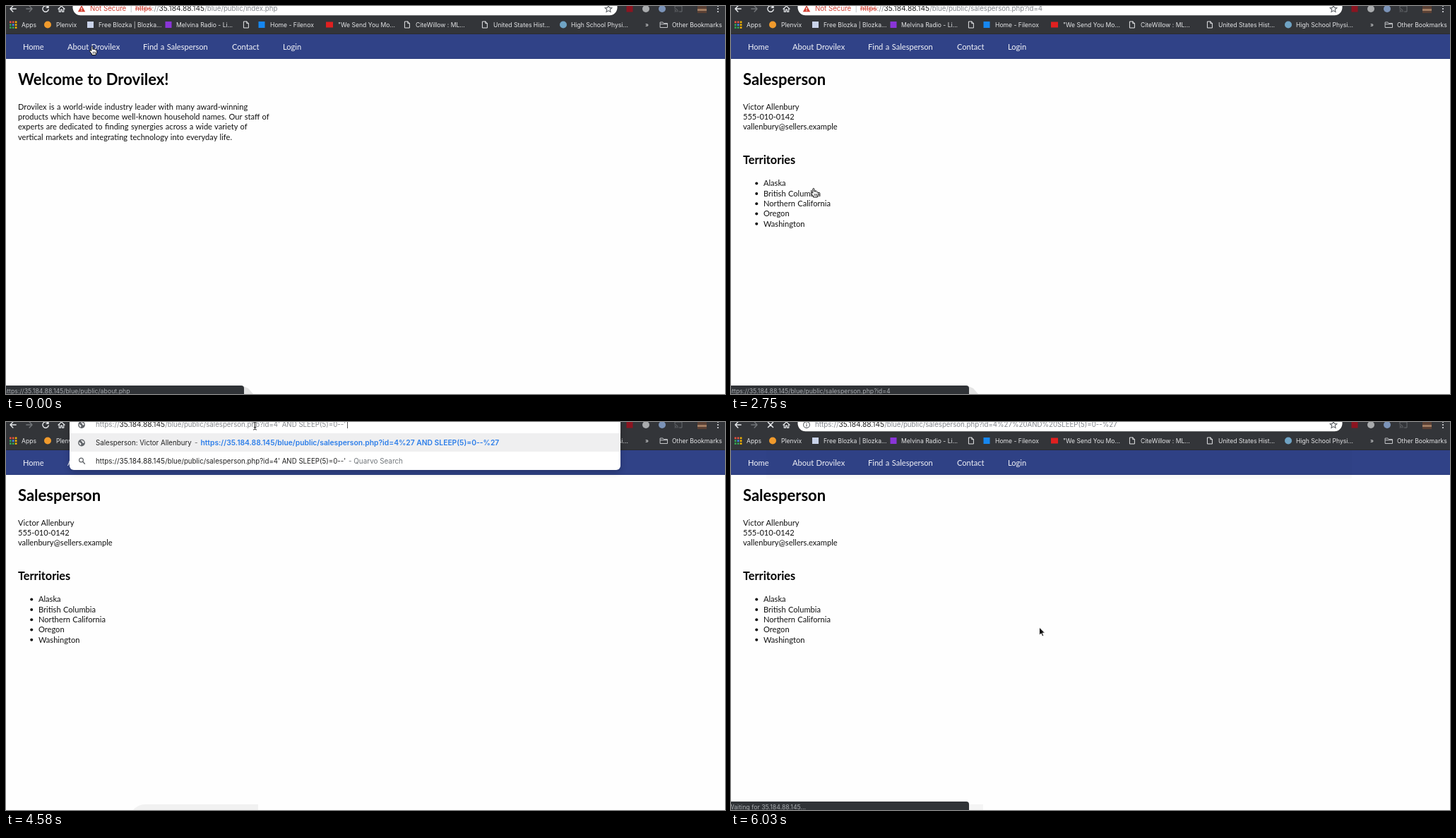
An HTML page for the animation above (8 s loop, 1018 by 550 pixels).

```html
<!DOCTYPE html>
<html lang="en">
<head>
<meta charset="utf-8">
<title>Browser session</title>
<style>
html, body { margin: 0; width: 100%; height: 100%; overflow: hidden; background: #fefefe; }
svg { display: block; width: 100%; height: 100%; }
text { white-space: pre; }
.ui { font-family: Inter, Roboto, sans-serif; }
.page { font-family: Lato, "Open Sans", sans-serif; word-spacing: .6px; }
.raised { filter: drop-shadow(0 3px 4px rgba(0, 0, 0, .22)); }
</style>
</head>
<body>
<svg id="stage" viewBox="0 0 1018 550" xmlns="http://www.w3.org/2000/svg"></svg>
<script>
const LOOP = 8000;
const HOST = '35.184.88.145';
const DIR = '/blue/public/';
const REP = 'Victor Allenbury';
const LINE = 14.3;

// ---- drawing helpers ----
const text = (cls, x, y, s, size, fill, extra = '') =>
  `<text class="${cls}" x="${x}" y="${y}" font-size="${size}" fill="${fill}" ${extra}>${s}</text>`;
const ui = (x, y, s, size, fill, extra) => text('ui', x, y, s, size, fill, extra);
const body = (x, y, s, fill = '#111', extra) => text('page', x, y, s, 11.1, fill, extra);
const title = (x, y, s, size) => text('page', x, y, s, size, '#000', 'font-weight="700"');
const link = (x, y, s) => body(x, y, s, '#00e', 'text-decoration="underline"');
const rect = (x, y, w, h, fill, extra = '') =>
  `<rect x="${x}" y="${y}" width="${w}" height="${h}" fill="${fill}" ${extra}/>`;
const dot = (x, y, r, fill, extra = '') => `<circle cx="${x}" cy="${y}" r="${r}" fill="${fill}" ${extra}/>`;
const path = (d, fill, extra = '') => `<path d="${d}" fill="${fill}" ${extra}/>`;
const line = (d, color, w = 1.3) =>
  path(d, 'none', `stroke="${color}" stroke-width="${w}" stroke-linecap="round" stroke-linejoin="round"`);
const at = (x, y, s) => `<g transform="translate(${x} ${y})">${s}</g>`;

// ---- icons, centred on 0,0 ----
const doc = line('M-3.2-4.5H.8L3.4-1.8V4.5H-3.2ZM.8-4.5V-1.8H3.4', '#e4e5e7', 1);
const folder = line('M-5-3.5H-1.5L-.2-2H5V4H-5ZM-5-.8H5', '#c4c6c9', 1);
const globe = dot(0, 0, 4.9, '#5f6368') +
  path('M-3.8-1.2L-1.2.2L-.4 1.6L-1.2 3.8Q-3.8 2.4-3.8-1.2ZM-.6-3.8Q2.8-3.6 3.8-.6L2.4.8L.8-.4L1.2-1.8L-.8-2.2Z', '#eee');
const lens = line('M1.2 1.2L4 4.2', '#5f6368', 1.3) +
  dot(-1, -1, 2.9, 'none', 'stroke="#5f6368" stroke-width="1.2"');
const info = dot(0, 0, 4.4, 'none', 'stroke="#5f6368" stroke-width="1.1"') +
  rect(-.6, -.6, 1.2, 3, '#5f6368') + rect(-.6, -2.5, 1.2, 1.2, '#5f6368');
const warning = path('M0-5L5.2 4.3H-5.2Z', '#d23f31') + rect(-.6, -1.8, 1.2, 3, '#fff') + rect(-.6, 2, 1.2, 1.1, '#fff');
const star = path('M0-4.8L1.4-1.6L4.8-1.3L2.2 1L3 4.4L0 2.6L-3 4.4L-2.2 1L-4.8-1.3L-1.4-1.6Z', 'none',
  'stroke="#5f6368" stroke-width="1.1"');
const reload = line('M3.5-2.4A4.2 4.2 0 1 0 4.2 1M4-4.5V-1.6H1.1', '#e8eaed', 1.4);
const stop = line('M-3.5-3.5L3.5 3.5M3.5-3.5L-3.5 3.5', '#e8eaed', 1.5);
const home = line('M-4.6.2L0-4L4.6.2M-3.2-.5V4.2H-1V1.2H1V4.2H3.2V-.5', '#e8eaed', 1.2);
const arrowBack = line('M4.2 0H-4M-.2-4L-4 0L-.2 4', '#e8eaed', 1.4);
const arrowNext = line('M-4.2 0H4M.2-4L4 0L.2 4', '#73767a', 1.4);
const cast = line('M-5-1.5V-4H5V4H1.5M-5 4H-4.6M-5 1.8Q-2.8 1.8-2.8 4M-5-.2Q-.8-.2-.8 4', '#696c70', 1);

const beam = 'M-2-5Q0-5 0-3.8Q0-5 2-5M0-3.8V4.8M-2 6Q0 6 0 4.8Q0 6 2 6M-1.2 2.5H1.2';
const pointers = {
  arrow: path('M0 0V11.2L2.6 8.8L4.4 12.8L6.2 12L4.5 8.1H8Z', '#111', 'stroke="#fff" stroke-width=".9"'),
  hand: path('M-2.7.8V-5.3Q-1.6-7-.6-5.3V-1.6Q.6-2.6 1.3-1.3Q2.5-2 3.1-.8Q4.9-1.2 5.1.7V2.8Q4.9 4.2 3.8 5V6.5H-2V5L-4.9 1.3Q-5.6-.5-3.9-.3Z',
    '#fff', 'stroke="#111" stroke-width="1"') + line('M-.3 2V4.4M1.4 2V4.4M3 2V4.4', '#111', .7),
  beam: line(beam, '#fff', 2.2) + line(beam, '#222', 1)
};

// ---- browser chrome ----
function appGrid() {
  const colors = ['#e8513f', '#e8513f', '#f4b400', '#34a853', '#4285f4', '#f4b400', '#34a853', '#34a853', '#f4b400'];
  return colors.map((c, i) => rect(5 + i % 3 * 3.9, 21.5 + Math.floor(i / 3) * 3.9, 2.6, 2.6, c)).join('');
}

function bookmarks() {
  const labels = [[22, 'Apps'], [71, 'Plenvix'], [131, 'Free Blozka | Blozka...'], [241, 'Melvina Radio - Li...'],
    [374, 'Home - Filenox'], [470, '"We Send You Mo...'], [580, 'CiteWillow : ML...'],
    [690, 'United States Hist...'], [800, 'High School Physi...'], [905, '»'], [943, 'Other Bookmarks']];
  return appGrid() + labels.map(([x, s]) => ui(x, 29.6, s, 8.6, '#e4e5e7')).join('') +
    dot(59, 26.5, 5, '#f09a2c') + rect(115, 22, 9, 9, '#c9d3ea') + rect(225.5, 22, 9, 9, '#8a35d8') +
    rect(357.5, 22, 9, 9, '#1687f0') + rect(453, 22.5, 10, 8, '#e02020') + dot(789, 26.5, 5, '#6fa3c4') +
    [340, 568, 678].map(x => at(x, 26.5, doc)).join('') + at(931.5, 26.5, folder);
}

function toolbar(s) {
  const dots = [0, 4, 8].map(y => dot(1008, y, 1.1, '#dadce0')).join('');
  return rect(0, 0, 1018, 40, '#333539') + rect(0, 39, 1018, 1, '#292b2f') +
    at(10, 4, arrowBack) + at(33, 4, arrowNext) + at(56, 4, s.loading ? stop : reload) + at(78.5, 4, home) +
    rect(94.5, -12, 771, 25.3, '#fff', `rx="11" ${s.selected ? 'stroke="#a9cdf7" stroke-width="2"' : ''}`) +
    address(s) + at(853, 4, star) +
    rect(878.5, -1, 9, 9.5, '#8c1420') + dot(906, 4, 5, '#a9abad') + dot(929, 4, 5, '#7b93b8') + at(952, 4, cast) +
    rect(979, 0, 13, 10, '#5a4034') + rect(979, 4, 13, 3, '#a07c62') + dots + bookmarks();
}

// scheme, host and path as three runs
function url(x, y, tail, c, hostColor, schemeExtra) {
  return ui(x, y, `<tspan ${schemeExtra || ''}>https</tspan>://`, 9.9, c) +
    ui(x + 33.4, y, HOST, 10.2, hostColor) + ui(x + 98.3, y, DIR + tail, 9.7, c);
}

function address(s) {
  if (s.loading)
    return at(107, 4, info) + url(119, 7.4, 'salesperson.php?id=4%27%20AND%20SLEEP(5)=0--%27', '#80848a', '#222');
  const strike = 'text-decoration="line-through"';
  return at(107, 4, warning) + ui(119, 7.4, 'Not Secure', 9.7, '#d23f31') + rect(176.7, -1, 1, 10, '#c4c6c9') +
    (s.selected
      ? rect(183, -2, 259, 12.5, '#b2d4fb') + url(183, 7.4, s.url, '#3c4043', '#222', strike)
      : url(183, 7.4, s.url, '#80848a', '#222', `fill="#d23f31" ${strike}`));
}

function dropdown(s) {
  const typed = "salesperson.php?id=4' AND SLEEP(5)=0--'";
  return rect(90, -10, 780, 78, '#fff', 'rx="6" class="raised"') + rect(90, 16, 780, 26, '#efeff0') +
    at(107, 4, globe) + at(107, 29.5, globe) + at(107.5, 55, lens) +
    url(127, 7.4, typed, '#85888c', '#222') + (s.caret ? rect(483, -1, 1, 10, '#555') : '') +
    ui(127, 33, 'Salesperson: ' + REP, 9.7, '#222') + ui(267, 33, '-', 9.9, '#666') +
    ui(275.5, 33, `https://${HOST}${DIR}salesperson.php?id=4%27 AND SLEEP(5)=0--%27`, 10.3, '#2b7de9', 'font-weight="600"') +
    url(127, 58.7, typed, '#222', '#222') + ui(485, 58.7, '- Quarvo Search', 9.9, '#70757a');
}

function statusBar(s) {
  if (!s.status) return s.tail ? path('M180 550Q187 542 197 542H357V550Z', '#f1f1f1') : '';
  const tail = s.loading ? rect(337, 542, 20, 8, '#f4f4f4') : path('M336 539L343 542L350 550H336Z', '#e3e3e3');
  return tail + path('M0 538H333Q337 538 337 542V550H0Z', '#303337') + ui(-4, 548.9, s.status, 8.75, '#a9acb0');
}

// ---- web pages ----
function nav() {
  const items = [[24, 'Home'], [87, 'About Drovilex'], [194, 'Find a Salesperson'], [320, 'Contact'], [392, 'Login']];
  return rect(0, 40, 1018, 35, '#304287') + rect(0, 74, 1018, 1, '#2b3c7c') +
    items.map(([x, s]) => body(x, 62.2, s, '#f4f5fa')).join('');
}

const paragraph = (y, lines) => lines.map((s, i) => body(17, y + i * LINE, s)).join('');

const pages = {
  welcome: () => title(17, 112.3, 'Welcome to Drovilex!', 22) + paragraph(146.7, [
    'Drovilex is a world-wide industry leader with many award-winning',
    'products which have become well-known household names. Our staff of',
    'experts are dedicated to finding synergies across a wide variety of',
    'vertical markets and integrating technology into everyday life.']),

  territories() {
    const states = [['Alabama (AL)', 'Dylan Marsh'], ['Alaska (AK)', REP], ['Arizona (AZ)', 'Nora Belling'],
      ['Arkansas (AR)', 'Margaret Finley'],
      ['California (CA)', '*Northern California', REP, '*Southern California', 'Carrie Dornell'],
      ['Colorado (CO)', 'Nora Belling'], ['Connecticut (CT)', 'Pamela Westrick'], ['Delaware (DE)']];
    let y = 212.3;
    let out = title(17, 112.3, 'Find a Salesperson', 22) +
      paragraph(146.7, ['Use the list below to find a salesperson nearby. We are ready to serve', 'you!']) +
      body(17, 186.6, 'UNITED STATES', '#000', 'font-weight="700"');
    for (const [state, ...rows] of states) {
      out += body(17, y, state);
      rows.forEach((row, i) => {
        y += LINE;
        const region = row[0] === '*';
        if (region || !i) out += rect(34.5, y - 5.8, 4, 4, '#111');
        out += region ? body(46, y, row.slice(1)) : link(46, y, row);
      });
      y += 25.7;
    }
    return out;
  },

  salesperson: () => title(17, 112.3, 'Salesperson', 22) +
    paragraph(146.7, [REP, '555-010-0142', 'vallenbury@sellers.example']) + title(17, 223.6, 'Territories', 16.3) +
    ['Alaska', 'British Columbia', 'Northern California', 'Oregon', 'Washington']
      .map((s, i) => dot(36.2, 251.6 + i * LINE, 2, '#111') + body(46, 255.3 + i * LINE, s)).join('')
};

// ---- timeline: each step adds to the state before it ----
const move = (pointer, x, y, more) => ({ pointer, x, y, ...more });
const hover = file => ({ status: `https://${HOST}${DIR}${file}` });
const profile = 'salesperson.php?id=4';
const steps = [
  [0, move('hand', 123.5, 63, { page: 'welcome', url: 'index.php', ...hover('about.php') })],
  [140, move('hand', 109, 62)],
  [320, move('hand', 168, 61)],
  [500, move('hand', 213, 61, hover('territories.php'))],
  [950, { page: 'territories', url: 'territories.php' }],
  [1100, move('hand', 195, 63)],
  [1250, move('hand', 150, 66, hover('about.php'))],
  [1400, move('hand', 121, 68)],
  [1850, move('arrow', 121.5, 235)],
  [2000, move('arrow', 120, 247)],
  [2150, move('hand', 119, 262, hover(profile))],
  [2300, move('hand', 118.5, 264.5)],
  [2600, { page: 'salesperson', url: profile }],
  [2900, move('arrow', 165, 200)],
  [3050, move('arrow', 260, 95)],
  [3200, move('arrow', 335, 24, { status: '', tail: true })],
  [3380, move('beam', 352.5, 5)],
  [3680, { selected: true }],
  [4580, { drop: true, caret: true }],
  [4730, move('arrow', 372, 85, { caret: false })],
  [4880, move('arrow', 420, 225)],
  [5020, move('arrow', 436.5, 291)],
  [5470, { drop: false, selected: false, loading: true, ghost: .05 }],
  [5650, { ghost: .03 }],
  [5840, { status: `Waiting for ${HOST}...` }],
  [6030, { ghost: .015 }]
];

function draw(s) {
  const ghost = s.ghost ? rect(50, 40, 829, 40, '#000', `opacity="${s.ghost}"`) : '';
  return rect(0, 0, 1018, 550, '#fefefe') + pages[s.page]() + nav() + toolbar(s) + ghost +
    (s.drop ? dropdown(s) : '') + statusBar(s) + at(s.x, s.y, pointers[s.pointer]);
}

const stage = document.getElementById('stage');
let shown = -1;
function render(ms) {
  const t = ms % LOOP;
  const count = steps.filter(([start]) => start <= t).length;
  if (count !== shown) {
    shown = count;
    stage.innerHTML = draw(Object.assign({}, ...steps.slice(0, count).map(([, patch]) => patch)));
  }
}

const began = performance.now();
function tick() {
  render(performance.now() - began);
  requestAnimationFrame(tick);
}
tick();
</script>
</body>
</html>
```
